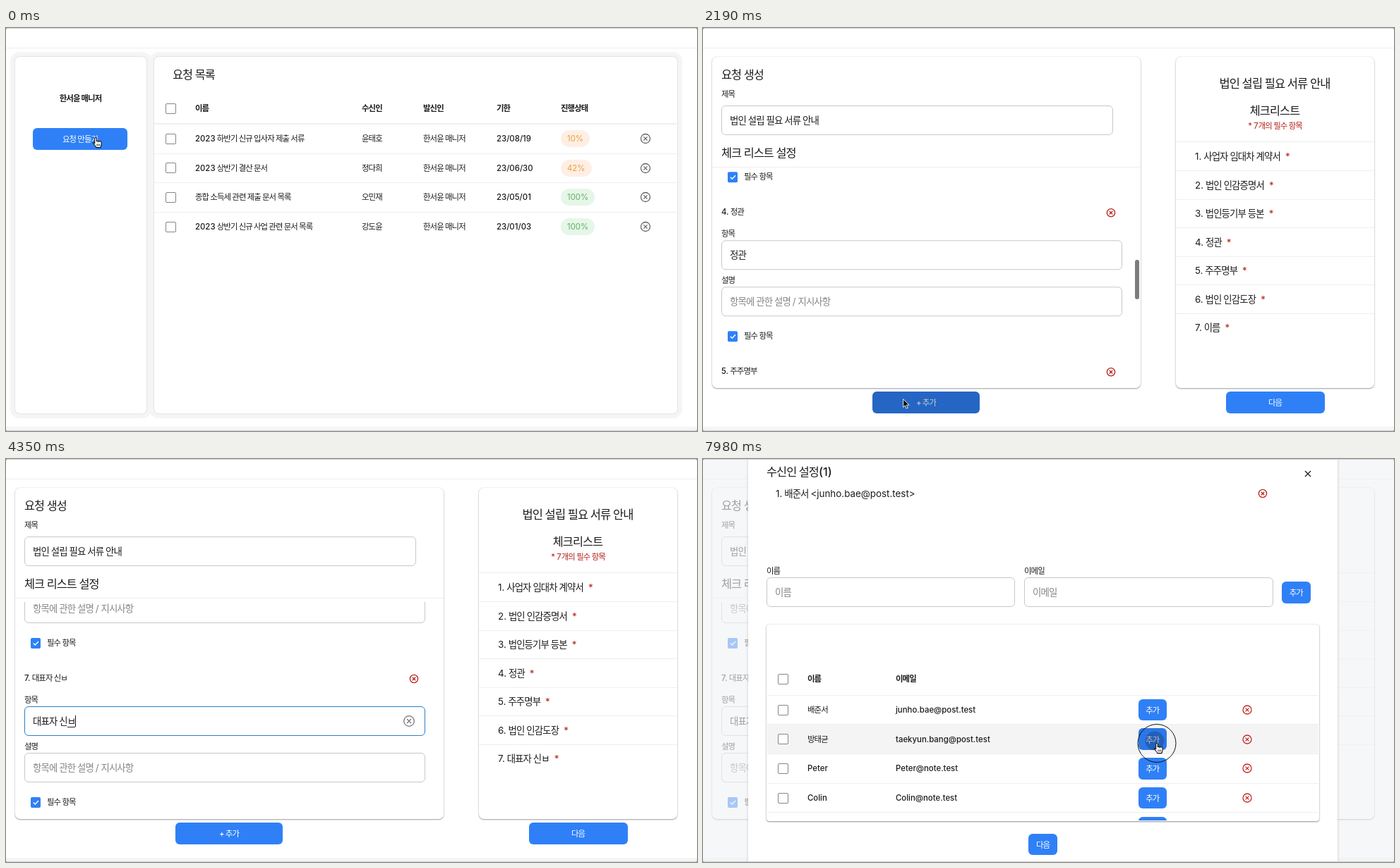
An HTML page that plays this animation: 979x572 px, repeating every 8 s.

```html
<!DOCTYPE html>
<html lang="ko">
<head>
<meta charset="utf-8">
<title>요청 생성</title>
<style>
html, body { margin: 0; width: 100%; height: 100%; overflow: hidden; background: #777; }
#stage { position: absolute; left: 0; top: 0; width: 979px; height: 572px; overflow: hidden; background: #fff; border-radius: 3px;
  font-family: Inter, "Noto Sans CJK KR", "Noto Sans CJK", sans-serif; color: #1c1c1c; letter-spacing: -.055em; }
#stage div, #stage svg { position: absolute; box-sizing: border-box; }
#stage svg { overflow: visible; fill: none; }
.layer { left: 0; top: 0; width: 979px; height: 572px; }
.t { line-height: 20px; white-space: pre; }
.t i { font-style: normal; letter-spacing: 0; }
.t u { text-decoration: none; border-bottom: 1px solid #222; }
.mid { transform: translateX(-50%); }
.wide { background: #f5f5f5; }
.frame { background: #fff; border-radius: 6px; box-shadow: 0 0 2px rgba(0,0,0,.22), 0 0 0 7px #f5f5f5; }
.card { background: #fff; border-radius: 7px; box-shadow: 0 1px 2px rgba(0,0,0,.36), 0 0 2px rgba(0,0,0,.14); }
.btn { background: #2f80f7; border-radius: 6px; color: #fff; font-size: 11.4px; font-weight: 500;
  display: flex; align-items: center; justify-content: center; white-space: pre; }
.input { border: 1px solid #c8c8c8; border-radius: 6px; background: #fff; }
.input.on { border: 1.5px solid #2a7fc9; }
.tick { border: 1.4px solid #858585; border-radius: 2px; background: #fff; }
.ticked { background: #2f80f7; border-radius: 2px; }
.rule { background: #efefef; }
.chip { border-radius: 12px; font-size: 11.4px; line-height: 24px; padding: 0 9px; letter-spacing: 0; height: 24px; }
.wait { background: #feefe6; color: #eda12f; }
.done { background: #e6f6e8; color: #5cb268; }
#caret { display: inline-block; position: static; width: 1px; height: 16px; margin-right: -1px; background: #111; vertical-align: -3px; }
#ring { width: 55px; height: 55px; border: 1.5px solid #111; border-radius: 50%; }
#ripple { width: 27px; height: 27px; border-radius: 50%; background: rgba(0,0,0,.2); }
#thumb { left: 612px; width: 6px; height: 56px; border-radius: 3px; background: #7d7d7d; }
</style>
</head>
<body>
<div id="stage"></div>
<script>
const BLUE = '#2f80f7', RED = '#b3201a', GREY = '#858585';
const PITCH = 226, MAX_SCROLL = 1263, LOOP = 8000;

const fmt = s => s.replace(/[^\s가-힣ㄱ-ㅎ]+/g, m => `<i>${m.replace(/</g, '&lt;')}</i>`);
const text = (x, y, s, size = 11.4, weight = 400, css = '', attr = '') =>
  `<div class="t" ${attr} style="left:${x}px;top:${y - 10}px;font-size:${size}px;font-weight:${weight};${css}">${fmt(s)}</div>`;
const center = (x, y, s, size, weight, css = '', attr = '') =>
  text(x, y, s, size, weight, 'transform:translateX(-50%);' + css, attr);
const box = (x1, y1, x2, y2, cls, inner = '', id = '') =>
  `<div class="${cls}" id="${id}" style="left:${x1}px;top:${y1}px;width:${x2 - x1}px;height:${y2 - y1}px">${inner}</div>`;
const button = (x1, y1, x2, y2, s, id) => box(x1, y1, x2, y2, 'btn', `<span>${s}</span>`, id);
const rule = (x1, x2, y, id) => box(x1, y, x2, y + 1, 'rule', '', id);
const tick = (x, y) => box(x - 7.5, y - 7.5, x + 7.5, y + 7.5, 'tick');
const crossIcon = (x, y, r, color, id = '') => {
  const d = r * .4;
  return `<svg id="${id}" style="left:${x}px;top:${y}px" width="1" height="1" stroke="${color}" stroke-width="1.3">
    <circle r="${r}"/><path d="M${-d} ${-d}L${d} ${d}M${d} ${-d}L${-d} ${d}"/></svg>`;
};

function listPage() {
  const rows = [
    ['2023 하반기 신규 입사자 제출 서류', '윤태호', '23/08/19', '10%'],
    ['2023 상반기 결산 문서', '정다희', '23/06/30', '42%'],
    ['종합 소득세 관련 제출 문서 목록', '오민재', '23/05/01', '100%'],
    ['2023 상반기 신규 사업 관련 문서 목록', '강도윤', '23/01/03', '100%']];
  const heads = [[268, '이름'], [504, '수신인'], [591, '발신인'], [695, '기한'], [786, '진행상태']];
  let h = box(12.5, 40.5, 198.5, 547, 'frame') + box(210, 40.5, 950.5, 547, 'frame')
    + center(105.5, 100, '한서윤 매니저', 11.4, 600)
    + button(38, 142, 172, 172.5, '요청 만들기', 'make')
    + text(236, 66, '요청 목록', 16.3, 500) + tick(233, 114)
    + heads.map(([x, s]) => text(x, 113.5, s, 11.4, 700)).join('')
    + box(210, 135, 950, 136.5, 'rule');
  rows.forEach(([name, to, due, state], i) => {
    const y = 157 + i * 41.7;
    h += tick(233, y) + text(268, y, name, 11.4, 500) + text(504, y, to, 11.4, 500)
      + text(591, y, '한서윤 매니저', 11.4, 500) + text(695, y, due, 11.4, 500)
      + `<div class="chip ${state === '100%' ? 'done' : 'wait'}" style="left:786px;top:${y - 12}px">${state}</div>`
      + crossIcon(905.5, y, 6.5, '#666');
    if (i < 3) h += rule(210, 950, y + 20.7);
  });
  return h;
}

const ITEMS = ['사업자 임대차 계약서', '법인 인감증명서', '법인등기부 등본', '정관', '주주명부', '법인 인감도장', ''];
const star = `<span style="color:${RED};margin-left:7px">*</span>`;

function formItem(name, i) {
  const y = i * PITCH, last = i === 6;
  const id = s => last ? `id="${s}"` : '';
  return text(26, y + 218, `${i + 1}. ${name}`, 11.4, 500, '', id('title7'))
    + crossIcon(578, y + 218.5, 5.6, RED)
    + text(26, y + 248.5, '항목', 11.4, 500)
    + box(26, y + 258, 594, y + 300, 'input', '', last ? 'field7' : '')
    + text(38, y + 279, name, 13.4, 400, '', id('value7'))
    + (last ? crossIcon(571, y + 279, 7.3, '#777', 'clear7') : '')
    + text(26, y + 314.5, '설명', 11.4, 500)
    + box(26, y + 324, 594, y + 365.5, 'input')
    + text(38, y + 344.5, '항목에 관한 설명 / 지시사항', 13.4, 400, 'color:#858585')
    + box(34.5, y + 387, 49, y + 401.5, 'ticked',
      '<svg width="15" height="15" stroke="#fff" stroke-width="1.4"><path d="M3.8 7.4L6.3 9.9L11 5"/></svg>')
    + text(58, y + 393.5, '필수 항목', 11.4, 400);
}

function formPage() {
  return box(0, 30, 979, 566, '', '<div class="layer" style="background:#fff;height:536px"></div>')
    + box(12.5, 40.5, 620, 510.5, 'card') + box(670, 40.5, 951, 510.5, 'card')
    + text(26, 66, '요청 생성', 16.3, 500) + text(26, 94, '제목', 11.4, 500)
    + box(26, 110, 581, 152, 'input') + text(38, 130.5, '법인 설립 필요 서류 안내', 13.4)
    + text(26, 177, '체크 리스트 설정', 16.3, 500) + rule(12.5, 620, 197)
    + `<div class="layer" style="clip-path:inset(203px 359px 62px 12px)"><div class="layer" id="scroll">${ITEMS.map(formItem).join('')}</div></div>`
    + '<div id="thumb"></div>'
    + button(240, 516, 392, 546.5, '+ 추가', 'add') + button(740.5, 516, 880.5, 546.5, '다음', 'next')
    + center(810, 79, '법인 설립 필요 서류 안내', 16.5, 500)
    + center(810, 117, '체크리스트', 16.3, 500)
    + center(810.5, 139, '', 11.4, 400, `color:${RED}`, 'id="count"')
    + rule(670, 951, 161)
    + ITEMS.map((name, i) => {
      const y = 182 + i * 40.5;
      return `<div id="entry${i}">` + (i ? rule(670, 951, y - 20.5) : '')
        + text(697, y, `${i + 1}. ${name}`, 13.4).replace('</div>', star + '</div>') + '</div>';
    }).join('');
}

function modalPage() {
  const people = [['배준서', 'junho.bae@post.test'], ['방태균', 'taekyun.bang@post.test'],
    ['Peter', 'Peter@note.test'], ['Colin', 'Colin@note.test'], ['', '']];
  let rows = '<div id="hover" style="left:91px;width:781px;height:41.7px;background:#f4f4f4"></div>';
  people.forEach(([name, mail], i) => {
    const y = 356 + i * 41.7;
    rows += rule(91, 872, y - 21.5) + tick(113, y) + text(148, y, name, 11.4, 500)
      + text(273, y, mail, 11.4, 500) + button(616.5, y - 15.3, 657, y + 15.3, '추가', 'pick' + i)
      + crossIcon(771, y, 6, '#c62828');
  });
  return '<div class="layer" style="background:rgba(241,243,246,.62)"></div>'
    + '<div style="left:64px;top:-10px;width:834.5px;height:600px;background:#fff;box-shadow:0 0 4px rgba(0,0,0,.18)"></div>'
    + text(90, 18, '', 16.3, 500, '', 'id="head"')
    + '<svg style="left:857px;top:20.5px" width="1" height="1" stroke="#222" stroke-width="1.4"><path d="M-4-4L4 4M4-4L-4 4"/></svg>'
    + `<div id="chosen">${text(103, 49, '1. 배준서 <junho.bae@post.test>', 13.4)}${crossIcon(793, 49, 5.6, RED)}</div>`
    + text(90, 158.5, '이름', 11.4, 500) + box(90, 168, 442, 210, 'input') + text(102, 188.5, '이름', 13.4, 400, 'color:#858585')
    + text(455, 158.5, '이메일', 11.4, 500) + box(455, 168, 807.5, 210, 'input') + text(467, 188.5, '이메일', 13.4, 400, 'color:#858585')
    + button(820, 174, 860.5, 204.5, '추가')
    + '<div style="left:90px;top:235px;width:783px;height:278.5px;border-radius:4px;box-shadow:0 1px 2px rgba(0,0,0,.4),0 0 2px rgba(0,0,0,.2);background:#fff"></div>'
    + tick(113, 312) + text(148, 312, '이름', 11.4, 700) + text(273, 312, '이메일', 11.4, 700)
    + `<div class="layer" style="clip-path:inset(236px 106px 59px 90px)">${rows}</div>`
    + button(461, 531.5, 502, 562, '다음');
}

const pointers = `<svg id="hand" width="1" height="1"><g transform="translate(-4.3 -.7)">
    <path d="M3 9.5V2a1.3 1.3 0 0 1 2.6 0v4.2a1.2 1.2 0 0 1 2.3.2a1.2 1.2 0 0 1 2.3.4a1.1 1.1 0 0 1 2.2.5v3c0 2-1 2.8-1.2 4.5H5.2C4.6 13 2.6 11.4 1 9.2c-.9-1.5.9-2.3 2 .3z" fill="#fff" stroke="#111" stroke-width="1.1"/>
    <path d="M6.2 9.8v2.8M8 9.8v2.8M9.8 9.8v2.8" stroke="#111" stroke-width=".8"/></g></svg>
  <svg id="arrow" width="1" height="1"><path d="M0 0v11.6l2.7-2.4 1.8 4.2 2-.9-1.8-4h3.8z" fill="#111" stroke="#fff" stroke-width=".9"/></svg>
  <svg id="beam" width="1" height="1"><path d="M-2.5-7Q0-7 0-5V5Q0 7-2.5 7M2.5-7Q0-7 0-5V5Q0 7 2.5 7" stroke="#333"/></svg>`;

document.getElementById('stage').innerHTML =
  box(0, 28, 979, 29, 'rule') + box(0, 566, 979, 572, 'wide')
  + `<div class="layer" id="list">${listPage()}</div>`
  + `<div class="layer" id="form">${formPage()}</div>`
  + `<div class="layer" id="modal">${modalPage()}</div>`
  + '<div class="layer" style="border-radius:3px;border:solid #d2d2d2;border-width:1px 0"></div>'
  + `<div id="ripple"></div>${pointers}<div id="ring"></div>`;

const $ = id => document.getElementById(id);
const clamp = v => Math.min(1, Math.max(0, v));
const prog = (t, a, b) => clamp((t - a) / (b - a));
const smooth = p => p * p * (3 - 2 * p);
const easeIn = p => p * p, easeOut = p => p * (2 - p);
const show = (id, on) => { $(id).style.visibility = on ? 'inherit' : 'hidden'; };
const within = (t, a, b) => t >= a && t < b;

// start, end, destination, easing
const START = [127, 155.5];
const MOVES = [
  [1110, 1350, 284, 418, easeIn], [1350, 1530, 285, 531, easeOut],
  [2130, 2400, 259, 446, easeIn], [2400, 2700, 250, 372, easeOut],
  [5310, 6060, 820, 532, smooth], [6690, 7200, 640, 358, smooth], [7500, 7920, 643, 403.5, smooth]];
const CLICKS = [[1620, 1830], [2760, 2940], [6150, 6300], [7260, 7440], [7950, LOOP]];
const TYPED = [[3480, 'ㄷ'], [3570, '대'], [3720, '댚'], [3810, '대표'], [3870, '대푲'], [3960, '대표자'],
  [4020, '대표자 '], [4110, '대표자 ㅅ'], [4200, '대표자 시'], [4290, '대표자 신'], [4350, '대표자 신ㅂ'],
  [4680, '대표자 신부'], [4770, '대표자 신분'], [4860, '대표자 신붅'], [4950, '대표자 신분즈'], [5040, '대표자 신분증']];

function pointerAt(t) {
  let [x, y] = START;
  for (const [a, b, tx, ty, ease] of MOVES) {
    if (t < a) break;
    const p = ease(prog(t, a, b));
    x += (tx - x) * p;
    y += (ty - y) * p;
  }
  return [x, y];
}

function shapeAt(t, x) {
  if (within(t, 3480, 5310)) return '';
  if (within(t, 2490, 3480)) return 'beam';
  if (within(t, 2160, 2490) || within(t, 5310, 6690) && x < 741 || within(t, 6700, 7450) && x > 657) return 'arrow';
  return 'hand';
}

let shown = '';
function drawTyping(t) {
  let value = '';
  for (const [at, s] of TYPED) if (t >= at) value = s;
  const focus = within(t, 2760, 6180), caret = focus && !within(t, 5310, 5730);
  const key = value + focus + caret;
  if (key === shown) return;
  shown = key;
  const open = value && !value.endsWith(' ') && value !== '대표자 신분증';
  const body = open ? value.slice(0, -1) + `<u>${value.slice(-1)}</u>` : value;
  const bar = caret ? '<span id="caret"></span>' : '';
  const hint = `<span style="color:#858585">${fmt('항목 이름 (ex. 신분증, 여권 등)')}</span>`;
  $('value7').innerHTML = value ? body + bar : bar + hint;
  $('title7').innerHTML = fmt('7. ' + (value || '항목을 작성하세요'));
  $('entry6').querySelector('.t').innerHTML = fmt('7. ' + (value || '이름')) + star;
  $('field7').className = focus ? 'input on' : 'input';
  show('clear7', value);
}

function draw(t) {
  const [x, y] = pointerAt(t);
  $('make').style.filter = t >= 30 ? 'brightness(.75)' : 'none';
  $('list').style.visibility = t < 930 ? 'visible' : 'hidden';
  $('form').style.opacity = smooth(prog(t, 300, 930));

  const scroll = MAX_SCROLL * smooth(prog(t, 1895, 2485));
  $('scroll').style.transform = `translateY(${-scroll}px)`;
  $('thumb').style.top = 205 + scroll * .1954 + 'px';
  $('thumb').style.opacity = t < 1895 ? 0 : 1 - prog(t, 2970, 3180);
  const press = prog(t, 1620, 1830) * (1 - prog(t, 2160, 2340));
  $('add').style.filter = `brightness(${1 - .25 * press})`;
  $('next').style.filter = `brightness(${1 - .25 * prog(t, 6090, 6340)})`;
  const added = t >= 1710;
  $('count').innerHTML = fmt(`* ${added ? 7 : 6}개의 필수 항목`);
  show('entry6', added);
  drawTyping(t);

  $('modal').style.opacity = smooth(prog(t, 6150, 6300));
  const picked = t >= 7350;
  $('head').innerHTML = fmt(`수신인 설정(${picked ? 1 : 0})`);
  show('chosen', picked);
  const row = Math.floor((y - 334.5) / 41.7);
  const over = t > 6690 && y < 513 && row >= 0;
  show('hover', over);
  $('hover').style.top = 335 + row * 41.7 + 'px';

  const click = CLICKS.some(([a, b]) => within(t, a, b));
  const ripple = click && t > 6690;
  for (let i = 0; i < 2; i++) $('pick' + i).style.filter = ripple && row === i ? 'brightness(.93)' : 'none';
  show('ripple', ripple);
  $('ripple').style.transform = `translate(${x - 16.5}px,${y - 17}px)`;
  show('ring', click);
  $('ring').style.transform = `translate(${x - 27.5}px,${y - 27.5}px)`;
  const shape = shapeAt(t, x);
  for (const id of ['hand', 'arrow', 'beam']) {
    show(id, id === shape);
    $(id).style.transform = `translate(${x}px,${y}px)`;
  }
}

const t0 = performance.now();
function tick60() {
  draw((performance.now() - t0) % LOOP);
  requestAnimationFrame(tick60);
}
tick60();
</script>
</body>
</html>
```
